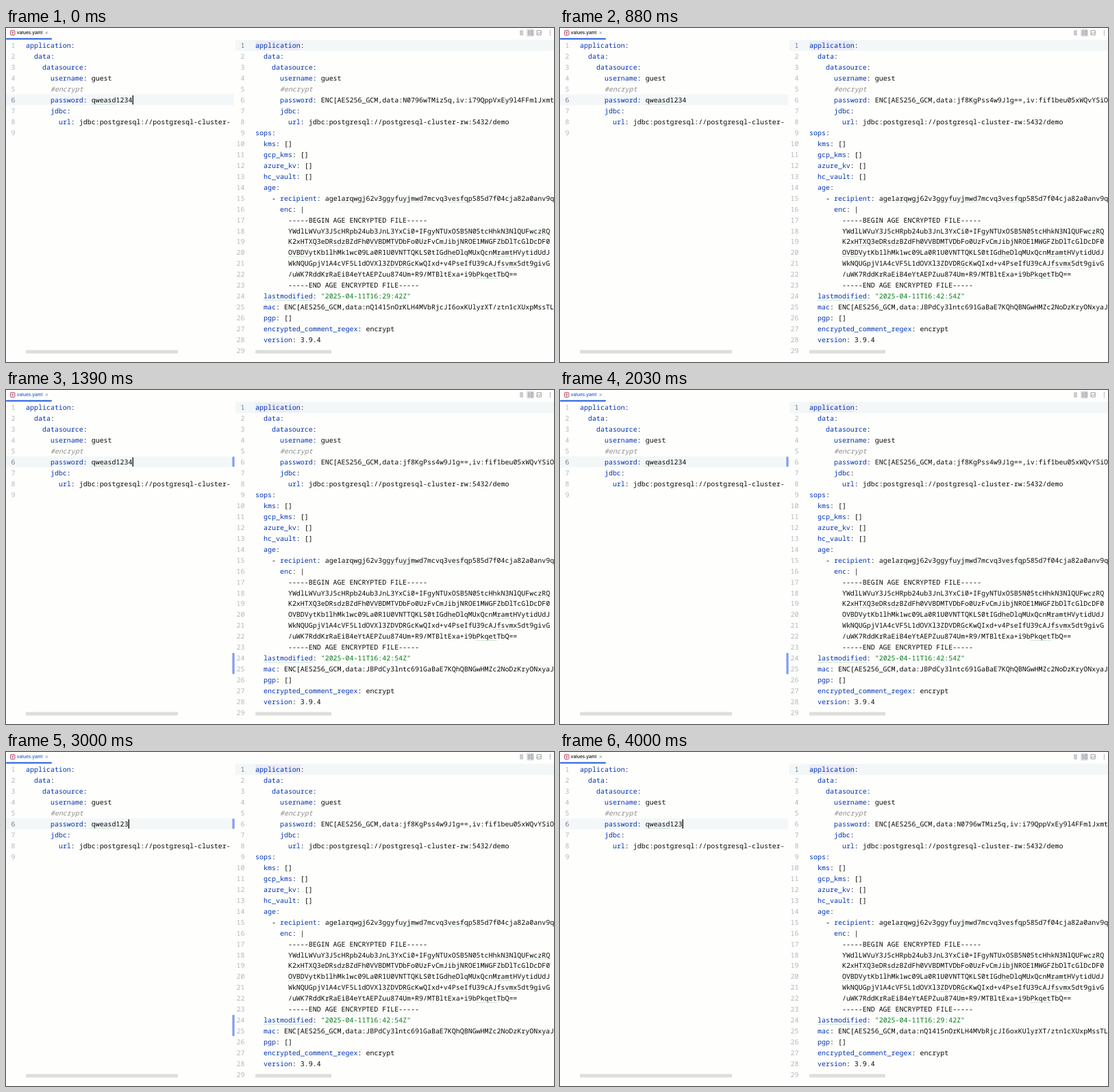
Recreate the animation shown at these times as an HTML page. Size 800 by 489 pixels, loop 4.45 s.

```html
<!DOCTYPE html>
<html lang="en">
<head>
<meta charset="utf-8">
<title>Encrypted values editor</title>
<style>
  html, body { margin: 0; width: 100%; height: 100%; overflow: hidden; background: #fefefc; }
  svg { display: block; width: 800px; height: 489px; }
  .code text { font: 500 9.96px "Noto Sans Mono", "DejaVu Sans Mono", monospace; fill: #080808; white-space: pre; text-rendering: geometricPrecision; }
  .code .key { fill: #0033b3; }
  .code .comment { fill: #8c8c8c; font-style: italic; }
  .code .string { fill: #067d17; }
  .code .number { fill: #b3b7c2; font-weight: 400; text-anchor: end; }
  .code .current { fill: #767a8a; }
  .typo { stroke: #a3d3ad; stroke-width: .8; stroke-dasharray: 1.5 .7; }
  .tab { font: 500 6.6px Inter, "Open Sans", sans-serif; }
  .icon { fill: none; stroke: #85898f; stroke-width: .8; }
</style>
</head>
<body>
<svg viewBox="0 0 800 489">
  <rect width="800" height="489" fill="#fefefc"/>
  <rect y="97.3" width="333" height="16" fill="#f3f7f8"/>
  <rect x="335" y="17.5" width="465" height="16" fill="#f3f7f8"/>
  <rect x="364" y="18.5" width="66" height="14" fill="#ebecf8"/>

  <rect x="6.5" y="3.5" width="6.5" height="7" rx="1.3" fill="#fbeaec" stroke="#a04a68" stroke-width=".9"/>
  <path d="M8.2 5 9.75 7 11.3 5M9.75 7V9.2" fill="none" stroke="#c93a4c" stroke-width=".9"/>
  <text id="tab" class="tab" x="15.8" y="9.3">values.yaml</text>
  <path class="icon" d="M57.6 5.3l3.4 3.4M61 5.3l-3.4 3.4" stroke-width=".6"/>
  <rect y="14.8" width="67" height="2.2" rx="1" fill="#3b6de0"/>

  <rect x="760" y="1.5" width="11" height="11" rx="2" fill="#dcdee3"/>
  <path class="icon" d="M750 4.2h5M750 6.1h5M750 8h5M750 9.9h5"/>
  <path class="icon" d="M762 4.2h3M762 6.1h3M762 8h3M762 9.9h3M766.7 3.8h2.3v6.3h-2.3z"/>
  <path class="icon" d="M775 3.8h6.3v6.3h-6.3zM775 9l2.2-2.3 1.6 1.5 2.4-2.4"/>
  <path d="M794.5 3.4v1.3M794.5 6.3v1.3M794.5 9.2v1.3" stroke="#7b7f8b" stroke-width="1.3"/>

  <clipPath id="leftClip"><rect width="329.5" height="489"/></clipPath>
  <g id="left" class="code" clip-path="url(#leftClip)"></g>
  <g id="right" class="code"></g>

  <g id="markers" fill="#7f9df0">
    <rect x="330.4" y="97.6" width="3.2" height="15" rx="1.4"/>
    <rect x="330.4" y="384.8" width="3.2" height="31.4" rx="1.4"/>
  </g>
  <rect x="29" y="471.5" width="222" height="5" fill="#dededc"/>
  <rect x="364" y="471.5" width="111" height="5" fill="#dededc"/>
  <rect id="caret" y="98.6" width="1.3" height="13.4" fill="#000"/>
</svg>
<script>
const LOOP = 4450, CHAR = 5.976, PITCH = 15.96, BASELINE = 29.2;
const $ = id => document.getElementById(id);

const application = (password, url) => `application:
  data:
    datasource:
      username: guest
      #encrypt
      password: ${password}
      jdbc:
        url: jdbc:postgresql://${url}`;

const leftSource = application('qweasd1234', 'postgresql-cluster-') + '\n';
const rightSource = application('', 'postgresql-cluster-rw:5432/demo') + `
sops:
  kms: []
  gcp_kms: []
  azure_kv: []
  hc_vault: []
  age:
    - recipient: age1arqwgj62v3ggyfuyjmwd7mcvq3vesfqp585d7f04cja82a0anv9q
      enc: |
        -----BEGIN AGE ENCRYPTED FILE-----
        YWdlLWVuY3J5cHRpb24ub3JnL3YxCi0+IFgyNTUxOSB5N05tcHhkN3NlQUFwczRQ
        K2xHTXQ3eDRsdzBZdFh0VVBDMTVDbFo0UzFvCmJibjNROE1MWGFZbDlTcGlDcDF0
        OVBDVytKb1lhMk1wc09La0R1U0VNTTQKLS0tIGdheDlqMUxQcnMramtHVytidUdJ
        WkNQUGpjV1A4cVF5L1dOVXl3ZDVDRGcKwQIxd+v4PseIfU39cAJfsvmx5dt9givG
        /uWK7RddKrRaEiB4eYtAEPZuu874Um+R9/MTBltExa+i9bPkqetTbQ==
        -----END AGE ENCRYPTED FILE-----
  lastmodified: ""
  mac: 
  pgp: []
  encrypted_comment_regex: encrypt
  version: 3.9.4
`;

const secrets = {
  before: {
    password: 'N0796wTMiz5q,iv:i79QppVxEy9l4FFm1Jxmt',
    time: '2025-04-11T16:29:42Z',
    mac: 'nQ1415nOrKLH4MVbRjcJI6oxKUlyrXT/ztn1cXUxpMssTL'
  },
  after: {
    password: 'jf8KgPss4w9J1g==,iv:fif1beu05xWQvYSiO',
    time: '2025-04-11T16:42:54Z',
    mac: 'JBPdCy3lntc691GaBaE7KQhQBNGwHMZc2NoDzKryONxyaJ'
  }
};

const typos = ['qweasd', 'arqwgj', 'fuyjmwd', 'vesfqp', 'FwczRQ', 'HTXQ', 'DRsdz', 'VVBDMTVD',
  'OVBDV', 'dhe', 'Mramt', 'ZDVDRG', 'Jfsvmx', 'Pkqet', 'lastmodified'];

function add(parent, tag, attrs, text = '') {
  const node = document.createElementNS('http://www.w3.org/2000/svg', tag);
  for (const name in attrs) node.setAttribute(name, attrs[name]);
  node.textContent = text;
  return parent.appendChild(node);
}

// Returns the value elements by key.
function drawCode(parent, source, x0, numberX, current) {
  const values = {};
  source.split('\n').forEach((line, i) => {
    const y = BASELINE + i * PITCH;
    const put = (text, col, cls = '') => add(parent, 'text', { x: x0 + col * CHAR, y, class: cls }, text);
    add(parent, 'text', { x: numberX, y, class: i + 1 === current ? 'number current' : 'number' }, i + 1);
    for (const word of typos) {
      const col = line.indexOf(word);
      if (col < 0) continue;
      const x1 = x0 + col * CHAR;
      add(parent, 'line', { x1, x2: x1 + word.length * CHAR, y1: y + 2.3, y2: y + 2.3, class: 'typo' });
    }
    const pair = line.match(/^(\s*)(- )?(\w+):(.*)$/);
    if (!pair) {
      const col = line.search(/\S/);
      if (col >= 0) put(line.trim(), col, line[col] === '#' ? 'comment' : '');
      return;
    }
    const [, indent, dash = '', key, value] = pair;
    const keyCol = indent.length + dash.length, colon = keyCol + key.length;
    if (dash) put('-', indent.length);
    put(key, keyCol, 'key');
    put(':', colon);
    values[key] = put(value.trim(), colon + 2, value.includes('"') ? 'string' : '');
  });
  return values;
}

const left = drawCode($('left'), leftSource, 29.1, 13.5, 6);
const right = drawCode($('right'), rightSource, 364.1, 348.5, 1);

const opacitySteps = [[0, 1], [560, 1], [650, 0], [970, 0], [1090, 1], [1950, 1], [2030, 0],
  [2340, 0], [2520, 1], [3340, 1], [3450, 0], [3890, 0], [4000, 1], [LOOP, 1]];
const caretSteps = [[0, 185], [2650, 185], [2730, 179], [LOOP, 179]];

function along(steps, t) {
  const i = steps.findIndex(step => step[0] > t);
  const [t0, a] = steps[i - 1], [t1, b] = steps[i];
  return a + (b - a) * (t - t0) / (t1 - t0);
}

const within = (t, from, to) => t >= from && t < to;

function setText(node, text) {
  if (node.textContent !== text) node.textContent = text;
}

function render(t) {
  const secret = within(t, 730, 3520) ? secrets.after : secrets.before;
  const modified = within(t, 1210, 3640);
  setText(left.password, t < 2670 ? 'qweasd1234' : 'qweasd123');
  setText(right.password, 'ENC[AES256_GCM,data:' + secret.password);
  setText(right.lastmodified, `"${secret.time}"`);
  setText(right.mac, 'ENC[AES256_GCM,data:' + secret.mac);
  $('markers').style.opacity = modified ? 1 : 0;
  $('tab').style.fill = modified ? '#1f5bd0' : '#111';
  $('caret').style.opacity = along(opacitySteps, t);
  $('caret').setAttribute('x', along(caretSteps, t) - .4);
}

const start = performance.now();
function tick() {
  render((performance.now() - start) % LOOP);
  requestAnimationFrame(tick);
}
tick();
</script>
</body>
</html>
```
